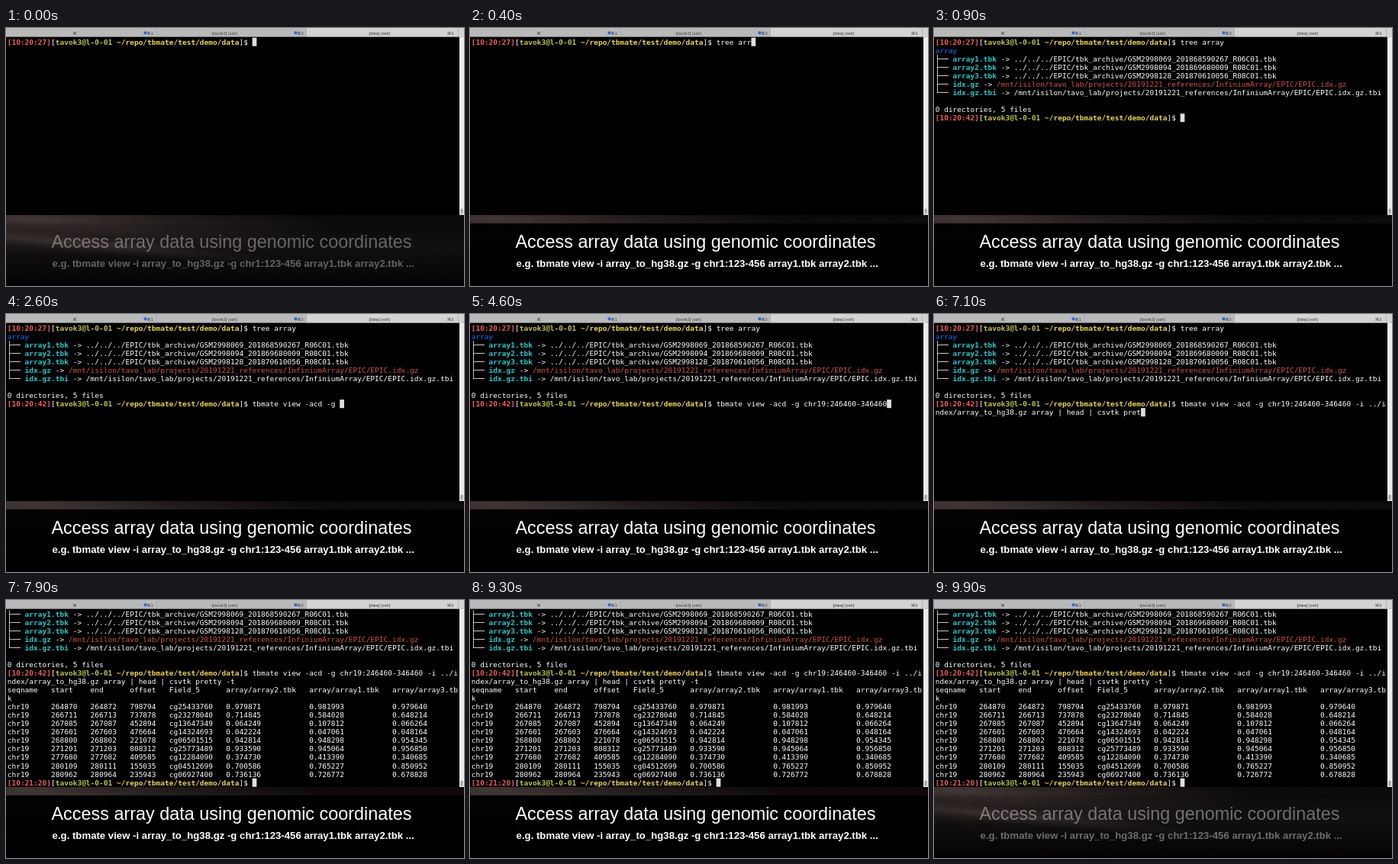
Animation, 600 px wide and 338 px high, one loop 10 s. Source, as an HTML page with a canvas:

```html
<!DOCTYPE html>
<html lang="en">
<head>
<meta charset="utf-8">
<title>Terminal demo</title>
<style>
  html, body { margin: 0; width: 100%; height: 100%; overflow: hidden; background: #000; }
  canvas { display: block; width: 600px; height: 338px; }
</style>
</head>
<body>
<canvas id="stage"></canvas>
<script>
const W = 600, H = 338, LOOP = 10000, STEP = 100;
const CW = 5.731, LH = 11.05, X0 = 1.7, BASE = 21.6;
const COLS = 103, ROWS = 21;
const MONO = '9.52px "DejaVu Sans Mono", monospace';

const WHITE = '#fff', RED = '#ee5f5a', GREEN = '#c0c54a', YELLOW = '#ecd456';
const BLUE = '#1450b4', CYAN = '#22c8ce', DEAD = '#d2534a';

const canvas = document.getElementById('stage');
const ctx = canvas.getContext('2d');
const dpr = window.devicePixelRatio || 1;
canvas.width = W * dpr;
canvas.height = H * dpr;
ctx.scale(dpr, dpr);

const run = (text, color = WHITE, bold = false) => ({ text, color, bold });

const prompt = clock => [
  run(`[${clock}]`, RED, true), run('['), run('tavok3@l-0-01 ', GREEN, true),
  run('~/repo/tbmate/test/demo/data', YELLOW, true), run(']$ ')
];

const link = (branch, name, path, color) =>
  [run(branch + '── '), run(name, CYAN, true), run(' -> '), run(path, color)];

const ARCHIVE = '../../../EPIC/tbk_archive/';
const INDEX = '/mnt/isilon/tavo_lab/projects/20191221_references/InfiniumArray/EPIC/EPIC.idx.gz';
const tree = [
  [run('array', BLUE, true)],
  link('├', 'array1.tbk', ARCHIVE + 'GSM2998069_201868590267_R06C01.tbk'),
  link('├', 'array2.tbk', ARCHIVE + 'GSM2998094_201869680009_R08C01.tbk'),
  link('├', 'array3.tbk', ARCHIVE + 'GSM2998128_201870610056_R08C01.tbk'),
  link('├', 'idx.gz', INDEX, DEAD),
  link('└', 'idx.gz.tbi', INDEX + '.tbi'),
  [],
  [run('0 directories, 5 files')]
];

const WIDTHS = [10, 9, 9, 9, 13, 19, 19, 0];
const table = `seqname start end offset Field_5 array/array2.tbk array/array1.tbk array/array3.tbk
chr19 264870 264872 798794 cg25433760 0.979871 0.981993 0.979640
chr19 266711 266713 737878 cg23278040 0.714845 0.584028 0.648214
chr19 267085 267087 452894 cg13647349 0.064249 0.107812 0.066264
chr19 267601 267603 476664 cg14324693 0.042224 0.047061 0.048164
chr19 268800 268802 221078 cg06501515 0.942814 0.948298 0.954345
chr19 271201 271203 808312 cg25773489 0.933590 0.945064 0.956850
chr19 277680 277682 409585 cg12284090 0.374730 0.413390 0.340685
chr19 280109 280111 155035 cg04512699 0.700586 0.765227 0.850952
chr19 280962 280964 235943 cg06927400 0.736136 0.726772 0.678828`
  .split('\n')
  .map(row => [run(row.split(' ').map((cell, i) => cell.padEnd(WIDTHS[i])).join(''))]);

const LIST = 'tree array';
const VIEW = 'tbmate view -acd -g chr19:246460-346460 -i ../index/array_to_hg38.gz array | head | csvtk pretty -t';
const LIST_DONE = 700, VIEW_DONE = 7800;

// [time, characters typed]
const listKeys = [[0, 0], [500, 10]];
const viewKeys = [[1200, 0], [2600, 20], [2700, 20], [4400, 38], [4500, 39],
                  [4900, 39], [5500, 43], [7100, 94], [7400, 99]];
const fadeKeys = [[0, .36], [100, .9], [200, 1], [9700, 1], [9800, .9], [9900, .4]];

function track(keys, t) {
  if (t <= keys[0][0]) return keys[0][1];
  for (let i = 1; i < keys.length; i++) {
    const [t0, v0] = keys[i - 1], [t1, v1] = keys[i];
    if (t <= t1) return v0 + (v1 - v0) * (t - t0) / (t1 - t0);
  }
  return keys[keys.length - 1][1];
}

const typed = (text, keys, t) => run(text.slice(0, Math.floor(track(keys, t) + .001)));

function session(t) {
  const lines = [[...prompt('10:20:27'), typed(LIST, listKeys, t)]];
  if (t >= LIST_DONE) lines.push(...tree, [...prompt('10:20:42'), typed(VIEW, viewKeys, t)]);
  if (t >= VIEW_DONE) lines.push(...table, prompt('10:21:20'));
  return lines;
}

// Lay the runs out on the character grid, wrapping at the last column
function layout(lines) {
  const cells = [];
  let row = 0, col = 0;
  lines.forEach((line, i) => {
    if (i) { row++; col = 0; }
    for (const { text, color, bold } of line) {
      for (const ch of text) {
        if (col === COLS) { row++; col = 0; }
        if (ch !== ' ') cells.push({ ch, color, bold, row, col });
        col++;
      }
    }
  });
  if (col === COLS) { row++; col = 0; }
  return { cells, row, col };
}

function rect(x, y, w, h, fill) {
  ctx.fillStyle = fill;
  ctx.fillRect(x, y, w, h);
}

function label(text, x, y, font, fill) {
  ctx.font = font;
  ctx.fillStyle = fill;
  ctx.textAlign = 'center';
  ctx.fillText(text, x, y);
}

function drawTerminal(t) {
  rect(0, 11, 594, 234, '#000');
  const { cells, row, col } = layout(session(t));
  const top = Math.max(0, row - ROWS + 1);
  rect(X0 + col * CW, BASE - 8.9 + (row - top) * LH, CW, LH, '#dedede');
  ctx.textAlign = 'left';
  for (const bold of [false, true]) {
    ctx.font = (bold ? 'bold ' : '') + MONO;
    for (const c of cells) {
      if (c.bold !== bold || c.row < top) continue;
      ctx.fillStyle = c.color;
      ctx.fillText(c.ch, X0 + c.col * CW, BASE + (c.row - top) * LH);
    }
  }
}

function drawTabs() {
  const font = '5.6px "Liberation Sans", "DejaVu Sans", sans-serif';
  rect(0, 0, W, 11.5, '#b9b9b9');
  rect(393.5, 0, 206.5, 11.5, '#d3d3d3');
  rect(0, 11, W, .6, '#8e8e8e');
  for (const x of [197, 393, 592]) rect(x, 0, .6, 11, '#a0a0a0');
  label('⌘', 90, 8.6, font, '#444');
  label('[tavok3] (ssh)', 286.5, 8.6, font, '#444');
  label('[data] (ssh)', 489.5, 8.6, font, '#333');
  [188.5, 385.5, 582].forEach((x, i) => label('⌘' + (i + 1), x, 8.6, font, '#444'));
  for (const x of [182.5, 379.5]) {
    ctx.fillStyle = '#2f62e8';
    ctx.beginPath();
    ctx.arc(x, 6.3, 2.1, 0, 7);
    ctx.fill();
  }
  rect(594, 11.5, 6, 233.5, '#ececec');
  ctx.fillStyle = '#a9a9a9';
  ctx.beginPath();
  ctx.roundRect(595.3, 236.5, 3.4, 7.5, 1.7);
  ctx.fill();
}

function glow(x, y, rx, ry, angle, color) {
  ctx.save();
  ctx.translate(x, y);
  ctx.rotate(angle);
  ctx.scale(rx, ry);
  const g = ctx.createRadialGradient(0, 0, 0, 0, 0, 1);
  g.addColorStop(0, `rgba(${color},.5)`);
  g.addColorStop(.5, `rgba(${color},.2)`);
  g.addColorStop(1, `rgba(${color},0)`);
  ctx.fillStyle = g;
  ctx.fillRect(-1, -1, 2, 2);
  ctx.restore();
}

function drawBackdrop() {
  const g = ctx.createLinearGradient(0, 245, 0, H);
  g.addColorStop(0, '#0b0909');
  g.addColorStop(.45, '#151213');
  g.addColorStop(1, '#050404');
  ctx.fillStyle = g;
  ctx.fillRect(0, 245, W, H - 245);
  ctx.save();
  ctx.beginPath();
  ctx.rect(0, 245, W, H - 245);
  ctx.clip();
  glow(30, 250, 400, 46, .04, '118,98,95');
  glow(60, 279, 330, 11, .09, '92,80,78');
  ctx.restore();
}

function drawCaption(t) {
  const a = track(fadeKeys, t);
  rect(0, 256, W, H - 256, `rgba(0,0,0,${.96 * a * a})`);
  const fill = `rgba(255,255,255,${a})`;
  label('Access array data using genomic coordinates', 295.5, 288.3,
    '23.4px "Liberation Sans", sans-serif', fill);
  label('e.g. tbmate view -i array_to_hg38.gz -g chr1:123-456 array1.tbk array2.tbk ...', 297.7, 313.2,
    'bold 13.2px "Liberation Sans", sans-serif', fill);
}

function draw(now) {
  const t = Math.floor(now % LOOP / STEP) * STEP;
  drawBackdrop();
  drawCaption(t);
  drawTerminal(t);
  drawTabs();
}

const start = performance.now();
function tick() {
  draw(performance.now() - start);
  requestAnimationFrame(tick);
}
tick();
</script>
</body>
</html>
```
